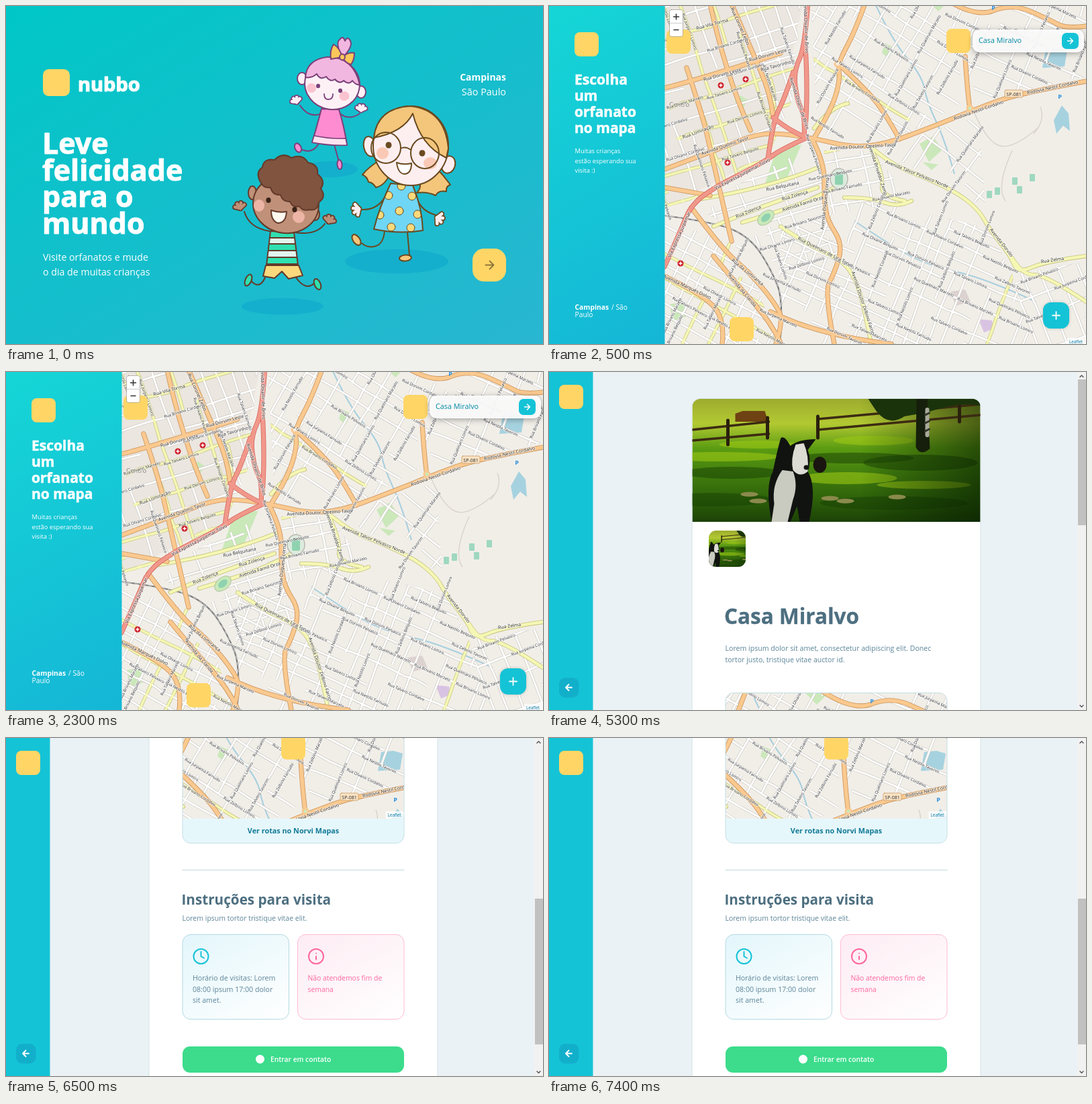
Recreate the animation shown at these times as an HTML page with a canvas. Size 800 by 503 pixels, loop 8000 ms.

```html
<!DOCTYPE html>
<html lang="pt-BR">
<head>
<meta charset="utf-8">
<title>Orfanatos</title>
<style>
html, body { margin: 0; width: 100%; height: 100%; overflow: hidden; background: #15c3d6; }
canvas { display: block; }
</style>
</head>
<body>
<canvas id="stage" width="800" height="503"></canvas>
<script>
const W = 800, H = 503, TAU = Math.PI * 2, RAD = Math.PI / 180;
const stage = document.getElementById('stage').getContext('2d');
let ctx = stage;

const YELLOW = '#ffd666', CYAN = '#15c3d6', SLATE = '#4d6f80', BODY = '#5c8599';
const HOUSE = 'Casa Miralvo';

// ---------- helpers ----------
function seeded(seed) {
  return () => {
    seed = (seed + 0x6d2b79f5) | 0;
    let t = Math.imul(seed ^ (seed >>> 15), 1 | seed);
    t = (t + Math.imul(t ^ (t >>> 7), 61 | t)) ^ t;
    return ((t ^ (t >>> 14)) >>> 0) / 4294967296;
  };
}

function text(s, x, y, size, color, { weight = 400, align = 'left', thick = 0, font = 'Open Sans' } = {}) {
  ctx.font = `${weight} ${size}px "${font}", sans-serif`;
  ctx.textAlign = align;
  ctx.fillStyle = ctx.strokeStyle = color;
  if (thick) {
    ctx.lineWidth = thick;
    ctx.lineJoin = 'round';
    ctx.strokeText(s, x, y);
  }
  ctx.fillText(s, x, y);
}

function box(x, y, w, h, r, fill, border, lw = 1) {
  ctx.beginPath();
  ctx.roundRect(x, y, w, h, r);
  if (fill) { ctx.fillStyle = fill; ctx.fill(); }
  if (border) { ctx.strokeStyle = border; ctx.lineWidth = lw; ctx.stroke(); }
}

const mark = (x, y, size = 36) => box(x, y, size, size, size * 0.22, YELLOW);

function clipped(path, draw) {
  ctx.save();
  ctx.clip(path);
  draw();
  ctx.restore();
}

function rounded(x, y, w, h, r) {
  const p = new Path2D();
  p.roundRect(x, y, w, h, r);
  return p;
}

function line(d, color, lw) {
  ctx.strokeStyle = color;
  ctx.lineWidth = lw;
  ctx.lineCap = ctx.lineJoin = 'round';
  ctx.stroke(new Path2D(d));
}

function shape(d, fill, ink, lw = 2) {
  ctx.fillStyle = fill;
  ctx.fill(new Path2D(d));
  if (ink) line(d, ink, lw);
}

function dot(x, y, rx, ry, fill, ink, rot = 0, lw = 2) {
  ctx.beginPath();
  ctx.ellipse(x, y, rx, ry, rot, 0, TAU);
  if (fill) { ctx.fillStyle = fill; ctx.fill(); }
  if (ink) { ctx.strokeStyle = ink; ctx.lineWidth = lw; ctx.stroke(); }
}

// Gradient running like the CSS angle over the given box.
function slope(deg, x, y, w, h, from, to) {
  const s = Math.sin(deg * RAD), c = -Math.cos(deg * RAD);
  const half = (Math.abs(w * s) + Math.abs(h * c)) / 2, cx = x + w / 2, cy = y + h / 2;
  const g = ctx.createLinearGradient(cx - s * half, cy - c * half, cx + s * half, cy + c * half);
  g.addColorStop(0, from);
  g.addColorStop(1, to);
  return g;
}

function arrow(x, y, r, dir, color, lw) {
  const tip = x + r * dir;
  line(`M${x - r * dir} ${y}H${tip}M${tip - r * dir} ${y - r}L${tip} ${y}L${tip - r * dir} ${y + r}`, color, lw);
}

// ---------- children ----------
function hand(x, y, deg, size, skin, ink) {
  for (const [color, lw] of [[ink, 8], [skin, 4.6]]) {
    for (let i = -1.5; i <= 1.5; i++) {
      const a = (deg + i * 42) * RAD;
      line(`M${x} ${y}L${x + Math.cos(a) * size} ${y + Math.sin(a) * size}`, color, lw);
    }
  }
}

function pinkGirl() {
  const ink = '#7b4079', skin = '#fdf1f6', hair = '#f1b7e0', pink = '#fd8dd0', bow = '#fcc75a';
  dot(482, 243, 42, 12, '#14afcd');
  line('M466 204Q460 216 449 216L441 214M489 206L496 232', ink, 2);
  dot(435, 211, 4.5, 7, pink, ink, -0.45);
  dot(497, 236, 3.5, 7, pink, ink, -0.1);
  line('M470 160Q452 168 438 148M495 158Q510 172 527 160', ink, 2);
  hand(433, 143, -110, 7, skin, ink);
  hand(529, 155, -85, 7, skin, ink);
  shape('M470 153Q463 180 456 203Q482 208 508 207Q504 180 496 154Z', pink, ink);
  shape('M459 193Q482 198 506 197L508 207Q482 208 456 203Z', '#fde3ef', ink, 1.5);
  dot(441, 108, 7, 9, skin, ink);
  dot(529, 128, 7, 9, skin, ink);
  dot(486, 116, 41, 38, skin, ink, 0.15);
  dot(455, 122, 7, 7, '#fbc3cf');
  dot(504, 134, 7.5, 7, '#fbc3cf');
  shape('M499 74Q491 54 497 50Q502 43 505 52Q509 44 513 52Q517 60 503 75Z', hair, ink);
  shape('M446 106Q448 80 478 76Q517 74 527 117Q521 118 516 111Q511 118 503 111Q497 117 490 109Q483 114 477 105Q468 111 463 101Q455 108 446 106Z', hair, ink);
  shape('M501 76L484 79Q482 66 488 57Q497 62 501 76Z', bow, ink);
  shape('M501 76Q510 68 519 70Q519 80 514 87Q505 85 501 76Z', bow, ink);
  dot(501, 76, 4, 4.5, bow, ink);
  dot(465, 119, 3, 3.2, ink);
  dot(498, 126, 3, 3.2, ink);
  line('M474 131Q474 139 480 139Q487 139 487 131', ink, 1.8);
}

function boy() {
  const ink = '#643a2a', skin = '#c09078', teal = '#2fe0b0';
  dot(412, 447, 61, 12.5, '#14afcd');
  line('M386 404Q378 422 366 410M432 404Q446 424 459 413', ink, 2);
  dot(361, 408, 4.5, 9, teal, ink, 0.4);
  dot(464, 414, 4.5, 8.5, teal, ink, -0.4);
  line('M392 335Q362 330 355 306M430 337Q462 342 475 324', ink, 2);
  hand(349, 301, -105, 8, skin, ink);
  hand(481, 321, -70, 8, skin, ink);
  shape('M387 386L383 402L400 405L411 395L421 406L442 401L436 386Z', '#fcd97c', ink);
  const shirt = 'M394 335Q391 360 388 386L435 386Q432 360 429 337Z';
  shape(shirt, '#e2f7ef');
  clipped(new Path2D(shirt), () => {
    for (const y of [335, 354, 374]) box(380, y, 64, 10, 0, teal, ink, 1.8);
  });
  line(shirt, ink, 2);
  dot(367, 278, 6, 10, skin, ink);
  dot(461, 310, 6, 9, skin, ink);
  dot(417, 295, 49, 43, skin, ink, 0.12);
  dot(377, 297, 8, 9, '#edb5a6');
  dot(436, 314, 9, 9, '#edb5a6');
  shape('M379 262Q371 247 382 240Q384 226 400 229Q412 217 425 226Q442 219 450 233Q466 236 464 250Q477 260 469 272Q478 284 466 292Q464 306 452 303Q442 306 437 298Q427 301 423 291Q412 292 409 281Q397 282 394 270Q384 272 379 262Z', '#80543f', ink);
  dot(391, 289, 3.6, 4, '#3a2218');
  dot(430, 303, 3.6, 4, '#3a2218');
  shape('M395 304Q406 308 418 306Q417 323 405 323Q395 320 395 304Z', '#fffaf0', ink);
}

function blondeGirl() {
  const ink = '#6a4a20', skin = '#fdeef0', hair = '#f4c67b', dress = '#70d6f5';
  dot(582, 380, 77, 18, '#14afcd');
  line('M564 335Q562 356 548 358Q538 360 530 353M598 337L601 371', ink, 2);
  dot(522, 348, 5, 9, hair, ink, -0.6);
  dot(595, 375, 9, 4.5, hair, ink, -0.1);
  line('M568 278Q556 304 530 303M609 276Q614 304 640 311', ink, 2);
  hand(526, 302, 165, 9, skin, ink);
  hand(642, 315, 25, 9, skin, ink);
  const gown = 'M573 264Q556 300 548 332Q586 340 621 334Q620 300 606 267Z';
  shape(gown, dress);
  clipped(new Path2D(gown), () => {
    for (const [x, y] of [[589, 268], [570, 282], [605, 283], [586, 305], [557, 311], [613, 310], [574, 329], [603, 330]])
      dot(x, y, 6, 6, '#fbd97a', ink, 0, 1);
  });
  line(gown, ink, 2);
  shape('M556 230Q540 240 531 251Q538 254 540 262Q546 262 551 270Q566 267 574 245Z', hair, ink);
  shape('M640 240Q652 252 662 266Q655 268 656 276Q644 274 640 282Q628 276 612 278Q622 268 612 256Z', hair, ink);
  dot(542, 209, 9, 15, skin, ink, -0.2);
  dot(659, 236, 10, 13, skin, ink, 0.3);
  dot(603, 208, 56, 59, skin, ink);
  dot(561, 219, 9, 9, '#fac9b5');
  dot(632, 234, 10, 9, '#fac9b5');
  shape('M548 196Q553 152 602 149Q654 154 659 212L656 226Q618 208 606 160Q592 188 548 196Z', hair, ink);
  dot(566, 211, 22, 23, null, ink);
  dot(624, 219, 21, 23, null, ink);
  line('M588 212Q595 208 603 214', ink, 2);
  dot(570, 207, 4.5, 4.8, ink);
  dot(620, 219, 4.5, 4.8, ink);
  shape('M582 233Q592 237 604 234Q604 250 593 250Q584 249 582 233Z', '#fff', ink);
}

// ---------- map ----------
const MAP_TOP = 12;
const ROADS = [
  { fill: '#f5f7b4', edge: '#c4c27c', width: 5, lines: [
    '480,210 510,236 560,255 612,280 642,306 656,332 688,372 698,398 740,380 800,372',
    '690,375 705,400 740,400 800,440', '480,212 498,250 494,284 530,290',
    '245,328 320,296 400,270', '288,322 345,305 400,285 440,262',
    '222,288 330,270 402,240', '345,328 385,355 430,375 452,396 468,440 480,503',
    '395,182 420,150 445,145', '440,285 480,285 520,300 540,290', '330,110 340,140 330,165'] },
  { fill: '#fac98f', edge: '#cb935a', width: 6, lines: [
    '172,243 250,214 310,190 350,190 400,198 450,210 500,206 560,184 640,152 700,130 800,112',
    '392,198 410,232 410,285 414,318 438,355 425,398 410,425 425,503',
    '395,196 418,160 434,112 430,85 455,40 474,-12', '430,85 470,122 500,158 522,198',
    '172,122 190,118 300,85 345,70', '268,-12 300,62 330,130 334,165', '238,-12 262,100 300,185',
    '205,92 228,160 242,220 272,350', '172,402 235,432 262,470 258,503',
    '212,300 258,362 300,398 335,440 350,468 338,503', '245,372 285,420 330,470 346,503',
    '330,455 400,490 510,503', '588,-12 634,18 690,-4 745,20 770,34 800,30',
    '620,75 622,112 626,146', '172,270 240,282'] },
  { fill: '#f1988b', edge: '#d4695e', width: 6, lines: [
    '172,388 196,335 212,295 250,268 300,243 326,228 345,214 384,196',
    '386,-12 382,60 364,98 370,142 382,165 380,196', '364,98 350,140 334,170 326,228',
    '334,166 358,186 384,196', '382,60 386,130 382,180'] },
];

// Each district: outline, street angle, street spacing, share of yellow streets.
const DISTRICTS = [
  ['172,-12 375,-12 362,140 326,225 210,290 172,300', -17, 21, 0.3],
  ['390,-12 585,-12 622,140 520,198 400,190', 32, 19, 0.03],
  ['215,300 400,205 412,310 430,370 350,400 300,340', -17, 20, 0.12],
  ['345,330 480,290 655,330 690,400 720,503 340,503', 24, 18, 0.02],
  ['172,318 290,360 340,503 172,503', 28, 19, 0.08],
  ['410,215 480,215 540,290 420,310', -12, 19, 0.1],
  ['585,-12 800,-12 800,105 640,142', 25, 25, 0.02],
  ['490,212 640,165 650,300 560,250', 38, 24, 0.03],
  ['690,400 800,380 800,503 720,503', -20, 24, 0],
];

const LABELS = [
  ['Rua Dorvim Leste', 258, 102, -15], ['Rua Dorvim Leste', 326, 73, -15], ['Rua Tavorinho', 338, 89, -15],
  ['Rua Vila Torma', 243, 27, -15], ['Rua Coronel Zelbo', 285, 30, 66], ['Rua Lomiração', 222, 187, -20],
  ['Avenida Quelmo Tavor', 262, 208, -19], ['Avenida Doutor Quelmo Tavor', 468, 209, -3],
  ['Rodovia Nestil Cordalvo', 640, 155, -19], ['Rodovia Nestil Cordalvo', 750, 121, -12],
  ['Avenida Olvanir de Brivo', 383, 30, 88], ['Avenida Olvanir de Brivo', 373, 145, 72],
  ['Via Expressa Jurpemar Tolvo', 288, 250, -28], ['Via Expressa Jurpemar', 194, 340, -66],
  ['Rua Belquitana', 348, 268, -12], ['Rua Zolença', 297, 306, -22], ['Rua Zolença', 366, 282, -16],
  ['Avenida Farnil Orza', 378, 294, -17], ['Avenida Duquesa Lorna', 411, 294, -84],
  ['Avenida Talvor Pelvasco Norde', 548, 250, 22], ['Avenida Brivaldor Zemo', 490, 244, 72],
  ['Rua Quelmaro de Lira Torvo', 412, 366, 27], ['Avenida Doutor Zelbino Farno', 468, 442, 72],
  ['Avenida Marquês Dolvo', 206, 418, 25], ['Rua da Lomirança', 296, 396, 39],
  ['Avenida da Clarida', 288, 423, 50], ['Avenida Dorvilo', 674, 352, 52], ['Rua Zelma', 750, 378, -8],
];
const FIRST = ['Talvero', 'Dorvim', 'Quelmaro', 'Brivano', 'Nestilo', 'Jurpema', 'Olvanir', 'Zelbino'];
const LAST = ['Marzelo', 'Tavorim', 'Belquito', 'Cordalvo', 'Farnudo', 'Lomiro', 'Pelvasco'];

const points = s => s.split(' ').map(p => p.split(',').map(Number));

function smooth(s) {
  const pts = points(s), path = new Path2D(), last = pts.length - 1;
  path.moveTo(...pts[0]);
  for (let i = 1; i < last; i++) {
    const [x, y] = pts[i], [nx, ny] = pts[i + 1];
    path.quadraticCurveTo(x, y, i === last - 1 ? nx : (x + nx) / 2, i === last - 1 ? ny : (y + ny) / 2);
  }
  if (last === 1) path.lineTo(...pts[1]);
  return path;
}

function strokeRoad(path, color, width) {
  ctx.strokeStyle = color;
  ctx.lineWidth = width;
  ctx.stroke(path);
}

function mapLabel(s, x, y, deg, size) {
  ctx.save();
  ctx.translate(x, y);
  ctx.rotate(deg * RAD);
  ctx.font = `${size}px "Noto Sans", sans-serif`;
  ctx.textAlign = 'center';
  ctx.lineWidth = 1.8;
  ctx.lineJoin = 'round';
  ctx.strokeStyle = 'rgba(255,255,255,.65)';
  ctx.strokeText(s, 0, 2.4);
  ctx.fillStyle = '#333';
  ctx.fillText(s, 0, 2.4);
  ctx.restore();
}

function district([outline, angle, gap, yellowShare], rnd, spots) {
  const area = new Path2D('M' + outline.replace(/ /g, 'L') + 'Z');
  const pts = points(outline), plain = new Path2D(), yellow = new Path2D();
  const mid = k => pts.reduce((sum, p) => sum + p[k], 0) / pts.length;
  const cx = mid(0), cy = mid(1), reach = Math.max(...pts.map(([x, y]) => Math.hypot(x - cx, y - cy)));
  for (const deg of [angle, angle + 88]) {
    const c = Math.cos(deg * RAD), s = Math.sin(deg * RAD);
    for (let off = -reach; off < reach; off += gap * (0.75 + rnd() * 0.5)) {
      const path = rnd() < yellowShare ? yellow : plain;
      for (let u = -reach, len; u < reach; u += len) {
        len = gap * (2 + rnd() * 5);
        const bend = (rnd() - 0.5) * gap * 0.5, skip = rnd() < 0.2, named = rnd() < 0.75;
        const at = (a, b) => [cx + a * c - b * s, cy + a * s + b * c];
        if (skip) continue;
        path.moveTo(...at(u, off));
        path.quadraticCurveTo(...at(u + len / 2, off + bend), ...at(u + len, off));
        const [x, y] = at(u + len / 2, off + bend / 2);
        if (named && len > 48 && ctx.isPointInPath(area, x, y + MAP_TOP)) spots.push([x, y, deg > 90 ? deg - 180 : deg]);
      }
    }
  }
  clipped(area, () => {
    strokeRoad(plain, '#c6c2bb', 4);
    strokeRoad(yellow, '#c4c27c', 5);
    strokeRoad(plain, '#fff', 2.8);
    strokeRoad(yellow, '#f5f7b4', 3.6);
  });
}

function paintMap() {
  const rnd = seeded(41), spots = [];
  ctx.fillStyle = '#f1eee8';
  ctx.fillRect(0, -MAP_TOP, W, H + MAP_TOP);
  shape('M172 -12H380L330 220L172 300Z', '#ebe6df');
  shape('M322 264L336 222L376 206L352 262Z', '#c9e9b8');
  for (const d of ['M276 142L286 133L296 140L290 150Z', 'M552 205L572 194L586 214L566 232Z', 'M556 232L580 236L570 244Z',
    'M600 -12L580 8L560 -12Z', 'M500 55L514 62L506 78L496 70Z', 'M352 214L372 206L362 240Z', 'M180 444L200 440L204 462L184 470Z'])
    shape(d, '#cbe8ba');
  for (const [x, y] of [[690, 255], [697, 268], [716, 250], [652, 275], [664, 270]]) box(x, y, 8, 11, 1, '#9fd8c0');
  shape('M640 466L660 468L662 480L648 486Z', '#d9c3e2');
  shape('M598 425L620 422L628 440L606 446Z', '#dcd2d0');
  shape('M735 92L740 64L758 62L772 66L768 90ZM752 170L764 148L774 160L776 186L766 178L756 190Z', '#a6d2df');
  for (const s of ['482,-12 510,50 556,104 563,143 590,200 604,250', '455,320 500,350 560,385 650,405 725,440'])
    strokeRoad(smooth(s), '#a6cfdf', 2);
  for (const s of ['630,150 650,200 690,215 730,180', '690,215 665,270 680,290', '722,190 740,170 732,150'])
    strokeRoad(smooth(s), '#d8d3ca', 1.4);
  DISTRICTS.forEach(d => district(d, rnd, spots));
  const rail = smooth('172,312 250,322 300,345 330,390 350,440 344,503');
  strokeRoad(rail, '#7b7b7b', 2.2);
  ctx.setLineDash([5, 5]);
  strokeRoad(rail, '#ddd', 0.9);
  ctx.setLineDash([]);
  ctx.lineCap = ctx.lineJoin = 'round';
  for (const { fill, edge, width, lines } of ROADS) {
    const paths = lines.map(smooth);
    paths.forEach(p => strokeRoad(p, edge, width + 1.2));
    paths.forEach(p => strokeRoad(p, fill, width - 0.4));
  }
  dot(430, 86, 4, 4, '#f1eee8', '#fac98f', 0, 3);
  dot(627, 152, 4, 4, '#cbe8ba', '#fac98f', 0, 3);
  dot(432, 257, 13, 15, '#dcebdd', '#b9b9b0', 0, 1.5);
  box(426, 248, 12, 18, 2, '#8fd2b0');
  dot(323, 315, 14, 9, '#c9e9b8', '#b5c9a5', -0.7, 1.2);
  dot(323, 315, 8, 5, '#8fd2b0', null, -0.7);
  text('Centro', 179, 150, 9.5, '#8a8683', { font: 'Noto Sans' });
  text('Jardim Nova Brelina', 639, 41, 9, '#8a8683', { font: 'Noto Sans' });
  const taken = LABELS.map(l => [l[1], l[2]]);
  for (const [x, y, deg] of spots) {
    const name = `Rua ${FIRST[rnd() * FIRST.length | 0]} ${LAST[rnd() * LAST.length | 0]}`;
    if (taken.some(([a, b]) => Math.hypot(a - x, b - y) < 25)) continue;
    taken.push([x, y]);
    mapLabel(name, x, y, deg, 6);
  }
  for (const [s, x, y, deg] of LABELS) mapLabel(s, x, y, deg, 7);
  box(679, 125, 27, 11, 2, '#fbe3c4', '#c99a62', 0.8);
  text('SP-081', 692.5, 133.5, 7, '#333', { align: 'center', font: 'Noto Sans' });
  for (const [x, y] of [[662, 6], [761, 138]]) text('P', x, y, 9, '#2a8fdc', { weight: 700, align: 'center', font: 'Noto Sans' });
  for (const [x, y] of [[293, 109], [256, 118], [266, 233], [196, 383]]) {
    dot(x, y, 4.5, 4.5, '#cf1f2b');
    line(`M${x - 2} ${y}h4M${x} ${y - 2}v4`, '#fff', 1.5);
  }
}

const map = document.createElement('canvas');
map.width = W;
map.height = H + MAP_TOP;
ctx = map.getContext('2d');
ctx.translate(0, MAP_TOP);
paintMap();
ctx = stage;

const drawMap = (x, y) => ctx.drawImage(map, x, y - MAP_TOP);

function attribution(x, y) {
  ctx.fillStyle = 'rgba(255,255,255,.75)';
  ctx.fillRect(x - 3, y - 8, 28, 11);
  text('Leaflet', x, y, 6.4, '#0078a8');
}

// ---------- photo, 429 by 183 ----------
function photo() {
  const grass = ctx.createLinearGradient(0, 0, 0, 183);
  ['#9dac2e', '#b3c932', '#5c9c12', '#427f0e', '#2f640a', '#1c4206'].forEach((c, i) => grass.addColorStop(i / 5, c));
  ctx.fillStyle = grass;
  ctx.fillRect(0, 0, 429, 183);
  for (const [x, y, rx, ry] of [[40, 86, 90, 7], [230, 118, 75, 9], [100, 68, 60, 6], [345, 128, 70, 6], [270, 62, 60, 7]])
    dot(x, y, rx, ry, 'rgba(155,200,20,.6)');
  for (const [x, y, rx, ry] of [[60, 110, 75, 9], [240, 88, 90, 8], [340, 95, 85, 12], [300, 155, 110, 10], [30, 150, 90, 10]])
    dot(x, y, rx, ry, 'rgba(25,65,5,.5)');
  const shade = ctx.createLinearGradient(250, 0, 429, 0);
  shade.addColorStop(0, 'rgba(5,25,0,0)');
  shade.addColorStop(1, 'rgba(5,25,0,.6)');
  ctx.fillStyle = shade;
  ctx.fillRect(250, 0, 179, 183);
  shape('M64 34V22L75 18H108L113 34Z', '#6e4212');
  line('M0 46L114 34M0 62L114 52M187 30L429 8M187 46L429 24', '#3c2b12', 3.5);
  line('M53 32V68M112 28V58M187 26V58M398 4V34', '#2b200e', 5);
  shape('M262 0L274 18Q292 42 316 26L350 20Q400 4 429 10V0Z', '#1b330b');
  shape('M334 0H350L354 74Q340 86 333 72Z', '#161f0b');
  line('M350 16V54', '#a9aa9a', 6);
  for (const y of [24, 36, 48]) line(`M347 ${y}l6 -3`, '#303628', 3);
  for (const [x, y] of [[85, 142], [98, 152], [205, 148], [228, 152], [305, 146]]) dot(x, y, 13, 3.5, '#8b8a4d');
  dot(190, 98, 10, 12, '#1a1510');
  shape('M118 183Q108 130 120 108Q128 70 132 58Q138 54 146 70Q158 60 184 60L172 76Q178 90 172 108Q186 130 174 183H160L156 160L146 183Z', '#111310');
  shape('M154 68Q146 90 150 106Q160 118 172 108Q174 84 166 66Z', '#dcdcd4');
  shape('M134 106Q118 128 122 156L118 183H142L150 150Q158 128 150 108Z', '#c9cbc0');
  dot(170, 102, 4, 3.5, '#111310');
}

// ---------- screens ----------
function landing() {
  ctx.fillStyle = slope(329.54, 0, 0, W, H, '#29b6d1', '#00c7c7');
  ctx.fillRect(0, 0, W, H);
  mark(55, 94, 40);
  text('nubbo', 107, 127, 29, '#fff', { weight: 700, thick: 1.2 });
  ['Leve', 'felicidade', 'para o', 'mundo'].forEach((s, i) =>
    text(s, 54, 220 + i * 39.5, 43, '#fff', { weight: 700, thick: 1 }));
  text('Visite orfanatos e mude', 55, 379, 14.2, '#fff');
  text('o dia de muitas crianças', 55, 401, 14.2, '#fff');
  text('Campinas', 745, 111, 14, '#fff', { weight: 700, align: 'right' });
  text('São Paulo', 745, 133, 14.4, '#fff', { align: 'right' });
  box(695, 361, 50, 49, 17, YELLOW);
  arrow(720.5, 385.5, 6, 1, '#8f773c', 1.8);
  pinkGirl();
  blondeGirl();
  boy();
}

function mapScreen() {
  drawMap(0, 0);
  mark(175, 35);
  mark(592, 34);
  mark(269, 463);
  box(179.5, 5.5, 20, 40, 3, '#fff', 'rgba(0,0,0,.25)');
  line('M181 25.5H198', '#ccc', 1);
  line('M185.5 16H193.5M189.5 12V20M186 35.5H193', '#333', 1.5);
  ctx.save();
  ctx.shadowColor = 'rgba(0,0,0,.35)';
  ctx.shadowBlur = 8;
  ctx.shadowOffsetY = 2;
  box(631, 35, 166, 34, 10, 'rgba(255,255,255,.92)');
  ctx.restore();
  text(HOUSE, 640, 55, 10.8, '#0089a5');
  box(764, 40, 25, 24, 7, CYAN);
  arrow(776.5, 52, 4, 1, '#fff', 1.5);
  attribution(775, 502);
  ctx.save();
  ctx.shadowColor = 'rgba(0,0,0,.2)';
  ctx.shadowBlur = 4;
  box(736, 441, 39, 39, 12, CYAN);
  ctx.restore();
  line('M750 460.5H761M755.5 455V466', '#fff', 1.8);
  ctx.fillStyle = slope(329.54, 0, 0, 172, H, '#15b6d6', '#15d6d6');
  ctx.fillRect(0, 0, 172.5, H);
  mark(38, 39);
  ['Escolha', 'um', 'orfanato', 'no mapa'].forEach((s, i) =>
    text(s, 38, 117 + i * 24, 21, '#fff', { weight: 700, thick: 0.5 }));
  ['Muitas crianças', 'estão esperando sua', 'visita :)'].forEach((s, i) => text(s, 38.5, 219 + i * 14.7, 9.4, '#fff'));
  text('Campinas', 38.5, 452, 10.3, '#fff', { weight: 700 });
  text('/ São', 93, 452, 10.3, '#fff');
  text('Paulo', 38.5, 463, 10.3, '#fff');
}

function detailFrame(cardTop, thumbY) {
  ctx.fillStyle = '#ebf2f5';
  ctx.fillRect(0, 0, W, H);
  box(213, cardTop, 430, 600, 12, '#fff', '#d3e2e5');
  ctx.fillStyle = CYAN;
  ctx.fillRect(0, 0, 65.5, H);
  mark(15, 19);
  box(15, 455, 29.5, 29.5, 9, '#12afcb');
  arrow(29.5, 469.5, 4.5, -1, '#fff', 1.9);
  ctx.fillStyle = '#f1f1f1';
  ctx.fillRect(787, 0, 13, H);
  ctx.fillStyle = '#c1c1c1';
  ctx.fillRect(788, thumbY, 12, 217);
  line('M791 7.5L793.5 5L796 7.5M791 496L793.5 498.5L796 496', '#505050', 1.4);
}

function detailTop() {
  detailFrame(39.5, 11);
  clipped(rounded(213.5, 40, 429, 183.5, [12, 12, 0, 0]), () => {
    ctx.translate(213.5, 40);
    photo();
  });
  clipped(rounded(238, 236, 55, 54, 11), () => {
    ctx.translate(202, 236);
    ctx.scale(0.295, 0.295);
    photo();
  });
  text(HOUSE, 261, 375, 31.5, SLATE, { weight: 700, thick: 0.3 });
  text('Lorem ipsum dolor sit amet, consectetur adipiscing elit. Donec', 262.5, 415, 10.58, BODY);
  text('tortor justo, tristique vitae auctor id.', 262.5, 432, 10.58, BODY);
  clipped(rounded(263, 477, 330, 60, 12), () => drawMap(-181, 487));
  box(263, 477.5, 330, 60, 12, null, '#c5dfe6');
}

function detailBottom() {
  detailFrame(-30, 239);
  clipped(rounded(263, -52, 330, 172, 0), () => {
    drawMap(-181, -43);
    mark(410, -4);
    attribution(568.5, 117);
  });
  box(263, 120, 330, 36.5, [0, 0, 12, 12], '#e6f7fb');
  box(263, -60, 330, 216.5, 12, null, '#c5dfe6');
  text('Ver rotas no Norvi Mapas', 428, 142, 10.8, '#127a98', { weight: 700, align: 'center' });
  line('M263 196.5H593', '#d3e2e6', 1.4);
  text('Instruções para visita', 261.5, 248, 20.7, SLATE, { weight: 700 });
  text('Lorem ipsum tortor tristique vitae elit.', 262.5, 272, 10.5, BODY);

  box(263, 292.5, 158.5, 126, 12, slope(150, 263, 292, 159, 127, '#e3f6fb', '#fff'), '#b3dae2');
  dot(290.5, 325, 11, 11, null, '#15c3d6', 0, 2);
  line('M290.5 318V325L295 327.5', '#15c3d6', 2);
  ['Horário de visitas: Lorem', '08:00 ipsum 17:00 dolor', 'sit amet.'].forEach((s, i) =>
    text(s, 278, 361 + i * 16.6, 10.6, BODY));

  box(434.5, 292.5, 158.5, 126, 12, slope(150, 434, 292, 159, 127, '#fdecf3', '#fff'), '#ffbcd4');
  dot(462, 325, 11, 11, null, '#ff669d', 0, 2);
  line('M462 325V329.5M462 320.5V320.6', '#ff669d', 2);
  text('Não atendemos fim de', 449.5, 361, 10.4, '#ff669d');
  text('semana', 449.5, 377.6, 10.4, '#ff669d');

  box(263, 459, 330, 39, 11, '#3cdc8c');
  dot(378.5, 478, 6.5, 6.5, '#fff');
  text('Entrar em contato', 394, 482, 10.3, '#fff', { weight: 600 });
}

// ---------- playback ----------
const LOOP = 8000;
const SCREENS = [[0, landing], [500, mapScreen], [3500, detailTop], [6500, detailBottom]];
let shown = null;

function tick() {
  const t = performance.now() % LOOP;
  const screen = SCREENS.findLast(([start]) => t >= start)[1];
  if (screen !== shown) {
    ctx.clearRect(0, 0, W, H);
    screen();
    shown = screen;
  }
  requestAnimationFrame(tick);
}
tick();
</script>
</body>
</html>
```
